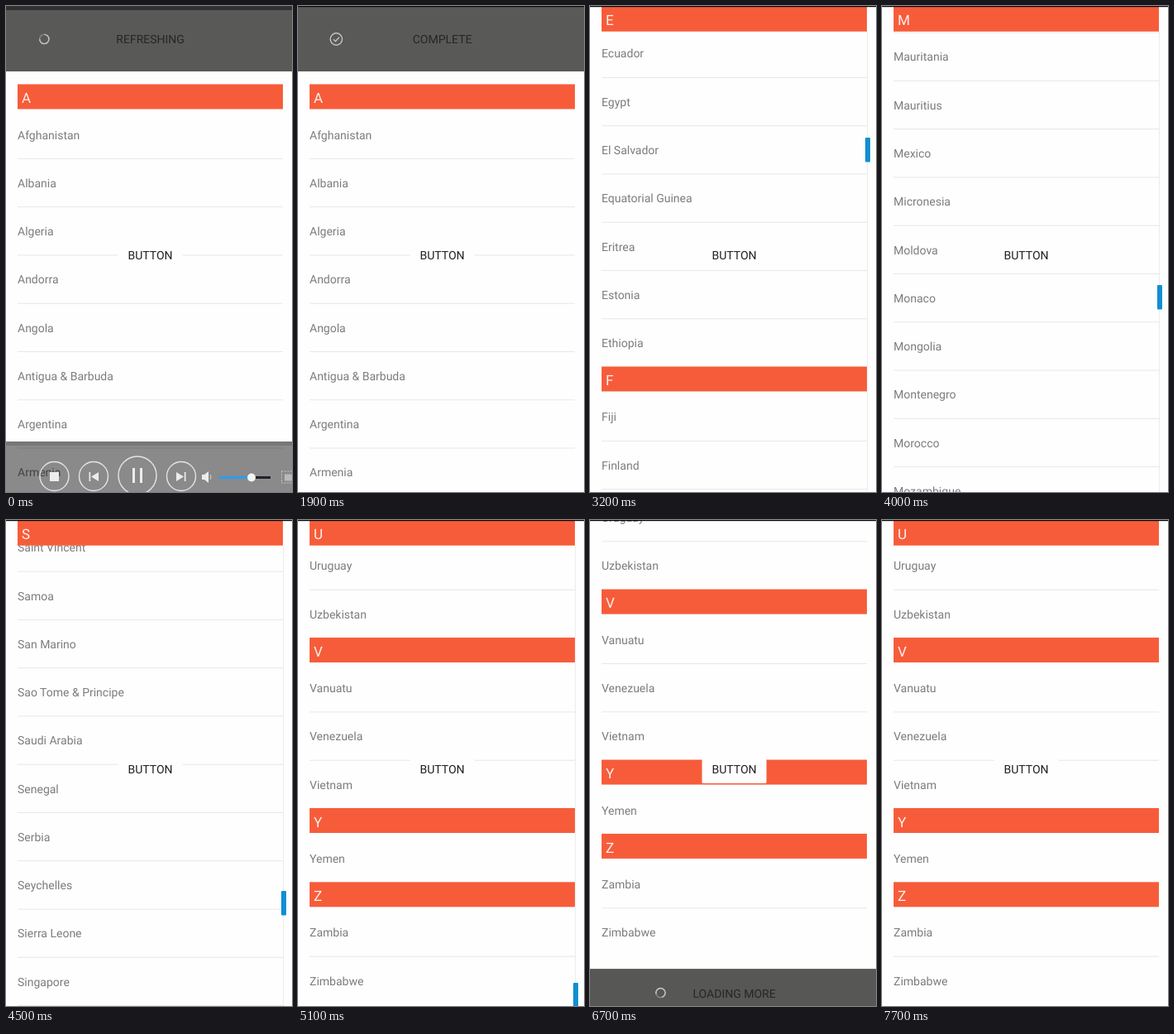
An HTML page that plays this animation: 346x587 px, repeating every 8000 ms.

```html
<!DOCTYPE html>
<html lang="en">
<head>
<meta charset="utf-8">
<title>Country list</title>
<style>
  html, body { margin: 0; width: 100%; height: 100%; overflow: hidden; background: #fefefe; }
  svg { display: block; width: 100vw; height: 100vh; }
  text { font: 14px Roboto, "Open Sans", sans-serif; text-rendering: geometricPrecision; }
  .row { fill: #7c7c7c; }
  .letter { font-size: 17px; fill: #fff1ec; }
  .mid { text-anchor: middle; fill: #262626; }
  .line { stroke: #e7e7e5; }
  .bar { fill: #f75c3a; }
  .ring { fill: none; stroke: #c4c4c4; stroke-width: 1.4; }
  .knob { fill: none; stroke: #e4e4e4; stroke-width: 1.4; }
  .icon { fill: #ececec; }
</style>
</head>
<body>
<svg id="stage" viewBox="0 0 346 587" preserveAspectRatio="none">
  <rect width="346" height="587" fill="#fefefe"/>
  <g id="page">
    <g id="list"></g>
    <g id="sticky">
      <rect class="bar" x="14" width="321" height="30"/>
      <text class="letter" id="stickyLetter" x="19" y="22.6"></text>
    </g>
    <g id="scrollbar">
      <path d="M335.5 31V587" stroke="#ececea"/>
      <rect id="thumb" x="333" width="6" height="29.5" rx="1" fill="#0e8fd2"/>
    </g>
    <g id="header">
      <rect y="-100" width="346" height="100" fill="#595958"/>
      <g transform="translate(46.3 -39)">
        <g id="headSpin"></g>
        <g id="check">
          <circle class="ring" r="7.2"/>
          <path class="ring" d="M-3.4 0.2L-1 2.7L3.6-2.3"/>
        </g>
      </g>
      <text class="mid" id="headText" x="174.6" y="-33.6"></text>
    </g>
    <g id="footer" transform="translate(0 600.5)">
      <rect width="346" height="100" fill="#575756"/>
      <g id="footSpin" transform="translate(85.4 29)"></g>
      <text class="mid" x="174.6" y="34.5">LOADING MORE</text>
    </g>
  </g>
  <rect x="135.5" y="288.5" width="78" height="29.5" rx="1.5" fill="#fefefe"/>
  <text class="mid" x="174.6" y="306" style="fill:#212121">BUTTON</text>
  <rect width="346" height="1.2" fill="#080808"/>
  <g id="player">
    <rect width="346" height="5" fill="#303033"/>
    <rect y="526" width="346" height="61" fill="#000" opacity=".46"/>
    <rect y="526" width="346" height="5" fill="#000" opacity=".14"/>
    <circle class="knob" cx="58.5" cy="568" r="17.5"/>
    <rect class="icon" x="53" y="563" width="11" height="11"/>
    <circle class="knob" cx="106" cy="568" r="17.5"/>
    <path class="icon" d="M100.5 563h1.7v11h-1.7zM112 563v11l-9-5.5z"/>
    <circle class="knob" cx="159" cy="567" r="23"/>
    <path class="icon" d="M153 558h3v18h-3zM162 558h3v18h-3z"/>
    <circle class="knob" cx="212" cy="568" r="17.5"/>
    <path class="icon" d="M206 563l9 5.5l-9 5.5zM215.800 563h1.700v11h-1.700z"/>
    <path class="icon" d="M237 566h3l5-4v14l-5-4h-3z"/>
    <path d="M247 566q2 3 0 6" fill="none" stroke="#d0d0d0"/>
    <path d="M258 569.500H297" stroke="#2d9cf0" stroke-width="3"/>
    <path d="M297 569.500H320" stroke="#20212b" stroke-width="3"/>
    <circle cx="297" cy="569.500" r="5" fill="#f4f4f4"/>
    <rect x="333.500" y="562" width="20" height="14" fill="none" stroke="#c4c4c4" stroke-dasharray="2 1.500"/>
    <rect x="337" y="565.500" width="14" height="8" fill="#b9b9b9"/>
  </g>
</svg>
<script>
const COUNTRIES = `Afghanistan,Albania,Algeria,Andorra,Angola,Antigua & Barbuda,Argentina,Armenia,Australia,Austria,Azerbaijan,
Bahamas,Bahrain,Bangladesh,Barbados,Belarus,Belgium,Belize,Benin,Bhutan,Bolivia,Bosnia & Herzegovina,Botswana,Brazil,Brunei,Bulgaria,Burkina Faso,Burundi,
Cambodia,Cameroon,Canada,Cape Verde,Central African Republic,Chad,Chile,China,Colombia,Comoros,Congo,Congo Democratic Republic,Costa Rica,Cote d'Ivoire,Croatia,Cuba,Cyprus,Czech Republic,
Denmark,Djibouti,Dominica,Dominican Republic,Ecuador,Egypt,El Salvador,Equatorial Guinea,Eritrea,Estonia,Ethiopia,Fiji,Finland,France,
Gabon,Gambia,Georgia,Germany,Ghana,Greece,Grenada,Guatemala,Guinea,Guinea-Bissau,Guyana,Haiti,Honduras,Hungary,
Iceland,India,Indonesia,Iran,Iraq,Ireland,Israel,Italy,Jamaica,Japan,Jordan,Kazakhstan,Kenya,Kiribati,Korea North,Korea South,Kosovo,Kuwait,Kyrgyzstan,
Laos,Latvia,Lebanon,Lesotho,Liberia,Libya,Liechtenstein,Lithuania,Luxembourg,
Macedonia,Madagascar,Malawi,Malaysia,Maldives,Mali,Malta,Marshall Islands,Mauritania,Mauritius,Mexico,Micronesia,Moldova,Monaco,Mongolia,Montenegro,Morocco,Mozambique,Myanmar,
Namibia,Nauru,Nepal,Netherlands,New Zealand,Nicaragua,Niger,Nigeria,Norway,Oman,Pakistan,Palau,Panama,Papua New Guinea,Paraguay,Peru,Philippines,Poland,Portugal,Qatar,Romania,Russia,Rwanda,
Saint Kitts & Nevis,Saint Lucia,Saint Vincent,Samoa,San Marino,Sao Tome & Principe,Saudi Arabia,Senegal,Serbia,Seychelles,Sierra Leone,Singapore,Slovakia,Slovenia,Solomon Islands,Somalia,South Africa,Spain,Sri Lanka,Sudan,Suriname,Swaziland,Sweden,Switzerland,Syria,
Taiwan,Tajikistan,Tanzania,Thailand,Togo,Tonga,Trinidad & Tobago,Tunisia,Turkey,Turkmenistan,Tuvalu,
Uganda,Ukraine,United Arab Emirates,United Kingdom,United States,Uruguay,Uzbekistan,Vanuatu,Venezuela,Vietnam,Yemen,Zambia,Zimbabwe`
  .split(",").map(s => s.trim());

const LOOP = 8000, STEP = 100;
const ROW = 58.27, SECTION = 31.1, TOP = 15.5, PIN = 0.8;
const $ = id => document.getElementById(id);

function add(parent, tag, attrs, text) {
  const el = document.createElementNS("http://www.w3.org/2000/svg", tag);
  for (const k in attrs) el.setAttribute(k, attrs[k]);
  if (text) el.textContent = text;
  return parent.appendChild(el);
}
const move = (el, y) => el.setAttribute("transform", `translate(0 ${y})`);
const show = (el, on) => el.setAttribute("visibility", on ? "visible" : "hidden");

// Piecewise linear value through [position, value] points.
function track(x, points) {
  if (x <= points[0][0]) return points[0][1];
  for (let i = 1; i < points.length; i++) {
    const [x0, v0] = points[i - 1], [x1, v1] = points[i];
    if (x <= x1) return v0 + (v1 - v0) * (x - x0) / (x1 - x0);
  }
  return points[points.length - 1][1];
}

// Lay the list out once; remember where sections and rows start.
const sections = [], rowTop = {};
let end = 0;
for (const name of COUNTRIES) {
  const letter = name[0];
  if (!sections.length || sections[sections.length - 1].letter !== letter) {
    sections.push({ letter, y: end });
    add($("list"), "rect", { class: "bar", x: 14, y: end, width: 321, height: 30 });
    add($("list"), "text", { class: "letter", x: 19, y: end + 22.6 }, letter);
    end += SECTION;
  }
  rowTop[name] = end;
  add($("list"), "text", { class: "row", x: 14, y: end + 34.9 }, name);
  const next = COUNTRIES[COUNTRIES.indexOf(name) + 1];
  if (next && next[0] === letter)
    add($("list"), "path", { class: "line", d: `M14 ${end + 58.8}H335` });
  end += ROW;
}

function makeSpinner(parent) {
  add(parent, "circle", { class: "ring", r: 5.6, opacity: 0.45 });
  return add(parent, "path", { class: "ring", d: "M0-5.6A5.6 5.6 0 1 1-5.6 0" });
}
const headArc = makeSpinner($("headSpin"));
const footArc = makeSpinner($("footSpin"));

// Scroll offset that puts the text of a row at height y.
const scrollTo = (name, y) => TOP + rowTop[name] + 29.9 - y;
const atE = scrollTo("Ecuador", 57.5);
const atM = scrollTo("Mauritania", 61.5);
const atEnd = scrollTo("Zimbabwe", 556.6);

const SCROLL = [[2550, 0], [3200, atE], [4000, atM], [5000, atEnd]];
const THUMB = [[0, 0], [atE, 159], [atM, 337], [atEnd, 559]];
const PULL_DOWN = [[2100, 79], [2200, 52], [2300, 24], [2400, 6], [2500, 0]];
const PULL_UP = [[5100, 0], [5600, 58.4], [7400, 58.4], [7500, 34], [7600, 11], [7700, 0]];

function draw(time) {
  const t = Math.floor(time / STEP) * STEP;
  const scroll = track(t, SCROLL);
  const down = track(t, PULL_DOWN);
  const listY = TOP - scroll;

  move($("page"), down - track(t, PULL_UP));
  move($("list"), listY);

  const i = sections.findLastIndex(s => s.y + listY < PIN);
  show($("sticky"), i >= 0);
  if (i >= 0) {
    const next = sections[i + 1];
    move($("sticky"), next ? Math.min(PIN, next.y + listY - 30) : PIN);
    $("stickyLetter").textContent = sections[i].letter;
  }

  $("thumb").setAttribute("y", track(scroll, THUMB));
  $("scrollbar").setAttribute("opacity", track(t, [[2500, 0], [2600, 1], [6100, 1], [6600, 0]]));

  const done = t >= 1900;
  $("headText").textContent = done ? "COMPLETE" : "REFRESHING";
  show($("headSpin"), !done);
  show($("check"), done);
  const spin = `rotate(${t * 0.36})`;
  headArc.setAttribute("transform", spin);
  footArc.setAttribute("transform", spin);

  $("player").setAttribute("opacity", track(t, [[0, 1], [600, 0]]));
}

function frame() {
  draw(performance.now() % LOOP);
  requestAnimationFrame(frame);
}
frame();
</script>
</body>
</html>
```
